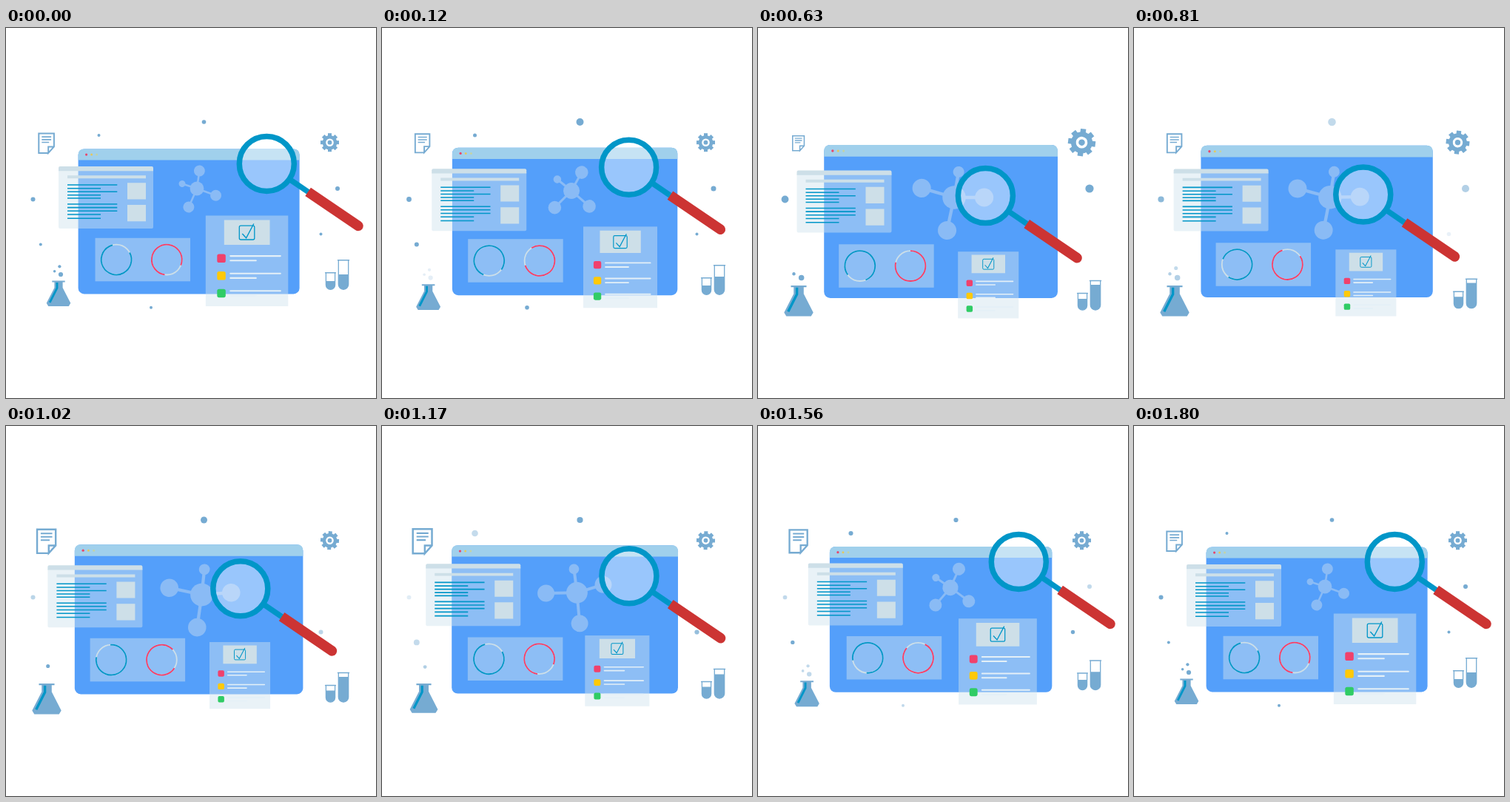
These frames come from a looping animation (500 px wide and 500 px high, 1830 ms). An HTML page:

```html
<!DOCTYPE html>
<html lang="en">
<head>
<meta charset="utf-8">
<title>Research dashboard</title>
<style>
  html, body { margin: 0; width: 100%; height: 100%; overflow: hidden; background: #fff; }
  svg { display: block; width: 100vw; height: 100vh; }
  .soft { fill: #76abd2; }
  .softLine { fill: none; stroke: #76abd2; }
  .glass { fill: #cfe3ed; fill-opacity: .46; }
  .pale { fill: #cddfe8; }
  .teal { fill: none; stroke: #0096c8; }
</style>
</head>
<body>
<svg viewBox="0 0 500 500">
  <g id="dots" class="soft"></g>

  <g id="page">
    <path class="softLine" stroke-width="2" d="M2.6 13.2H-10.3V-13.2H10.3V4.6L2.6 13.2V4.6H10.3"/>
    <path class="softLine" stroke-width="1.7" d="M-6.3-8.7H6.5M-6.3-5H6.5M-6.3-1.3H3.6"/>
  </g>

  <g id="gear"></g>

  <g id="tubes"></g>

  <g id="flask">
    <path class="soft" d="M-8.7-34.4H8.7V-32.4H5.6V-25L16.3-4.2L13.8 0H-13.8L-16.3-4.2L-5.6-25V-32.4H-8.7Z"/>
    <path class="teal" stroke-width="2.8" d="M-2-32V-24.5L-11.8-5.2"/>
    <g id="bubbles" class="soft"></g>
  </g>

  <g id="window">
    <rect x="-149.5" y="-98" width="299" height="196" rx="8" fill="#549ffa"/>
    <path fill="#a0d0ec" d="M-149.5-83V-90Q-149.5-98-141.5-98H141.5Q149.5-98 149.5-90V-83Z"/>
    <circle cx="-138.5" cy="-90.3" r="1.6" fill="#e8476c"/>
    <circle cx="-131.5" cy="-90.3" r="1.5" fill="#e3c860"/>
    <circle cx="-124.5" cy="-90.3" r="1.5" fill="#c3d3a5"/>
  </g>

  <g id="molecule" fill="#8abbf5" stroke="#8abbf5"></g>

  <g id="article">
    <rect class="glass" y="3" width="128" height="81" rx="2"/>
    <path class="pale" d="M0 6.2V2Q0 0 2 0H126Q128 0 128 2V6.2Z"/>
    <path class="pale" d="M12 12.3H118V16.2H12ZM93 22.3H118V44.4H93ZM93 52H118V74.2H93Z"/>
    <path id="text" class="teal" stroke-width="1.6"/>
  </g>

  <g id="charts">
    <rect class="glass" width="128.5" height="58.5"/>
  </g>

  <g id="card">
    <rect class="glass" width="111.5" height="122.5"/>
    <path class="pale" d="M25 6H86.7V39.6H25Z"/>
    <rect class="teal" x="45.5" y="13.7" width="20.5" height="18.8" rx="2" stroke-width="1.3"/>
    <path class="teal" stroke-width="1.4" d="M49.5 24.5L54.8 30.3L65 11"/>
  </g>

  <g id="lens">
    <circle r="37" fill="#fff" fill-opacity=".4"/>
    <g transform="rotate(34.2)">
      <path stroke="#0096c8" stroke-width="7.5" d="M39 0H70"/>
      <path fill="#cc3433" d="M67.5-6.8H149.5A6.8 6.8 0 0 1 149.5 6.8H67.5Z"/>
    </g>
    <circle class="teal" r="37" stroke-width="7.5"/>
  </g>
</svg>
<script>
const LOOP = 1830, STEP = 30;
const TIMES = [0, 120, 390, 630, 1020, 1350, 1800];
const COUNT = TIMES.length - 1;

const $ = id => document.getElementById(id);

function add(parent, tag, attrs) {
  const node = document.createElementNS('http://www.w3.org/2000/svg', tag);
  for (const key in attrs) node.setAttribute(key, attrs[key]);
  return parent.appendChild(node);
}

// Smooth periodic curve through one value per entry of TIMES, without overshoot;
// `gain` is what the value gains over a whole loop.
function curve(values, gain = 0) {
  const points = [...values, values[0] + gain];
  const span = i => TIMES[i + 1] - TIMES[i];
  const slope = i => (points[i + 1] - points[i]) / span(i);
  const tangents = points.map((_, i) => {
    const before = (i + COUNT - 1) % COUNT, after = i % COUNT;
    const a = slope(before), b = slope(after);
    if (a * b <= 0) return 0;
    const u = span(before), v = span(after);
    return 3 * (u + v) / ((2 * v + u) / a + (v + 2 * u) / b);
  });
  return t => {
    let i = 0;
    while (i < COUNT - 1 && t >= TIMES[i + 1]) i++;
    const h = span(i), x = Math.min(1, (t - TIMES[i]) / h), y = 1 - x;
    return points[i] * (1 + 2 * x) * y * y + points[i + 1] * (3 - 2 * x) * x * x
      + h * x * y * (tangents[i] * y - tangents[i + 1] * x);
  };
}

const steady = value => () => value;

function mover(id, x, y, scale = steady(1), turn = steady(0)) {
  const node = $(id);
  return t => node.setAttribute('transform',
    `translate(${x(t)} ${y(t)}) scale(${scale(t)}) rotate(${turn(t)})`);
}

// Floating dots: centre, radii, opacities
const dots = [
  [125.5, 145, [2, 2.5, 3.6, 4.2, 4.4, 4.1], [1, 1, 1, 0, 0, 1]],
  [267.5, 127, [2.8, 5, 6, 5.8, 4.5, 3.6], [1, 1, 0, 0, 1, 1]],
  [36.5, 231.5, [3, 3.4, 4.2, 4.9, 3, 2.8], [1, 1, 1, 1, .5, 0]],
  [46.8, 292.4, [2, 3, 4, 4.4, 4.2, 3.5], [1, 1, 0, 0, 0, 1]],
  [196, 377.7, [2, 2.8, 4.1, 4.6, 3, 2], [1, 1, 1, 0, 0, 0]],
  [448, 217, [3, 3.5, 4.7, 5.6, 4, 3], [1, 1, 1, 1, 0, 0]],
  [425.5, 278.5, [2, 2, 2, 2.5, 3, 3.2], [1, 1, 0, 0, .5, 1]]
].map(([cx, cy, radii, alphas]) => {
  const node = add($('dots'), 'circle', { cx, cy });
  const radius = curve(radii), alpha = curve(alphas);
  return t => {
    node.setAttribute('r', radius(t));
    node.setAttribute('opacity', alpha(t));
  };
});

const bubbles = [
  [3, -43, 3.1, [1, .2, 1, 1, 0, 0]],
  [1.4, -53.7, 2.1, [1, .2, 0, 0, 1, 0]],
  [-5.4, -47.3, 1.8, [1, .2, 0, 1, 0, 0]]
].map(([cx, cy, r, alphas]) => {
  const node = add($('bubbles'), 'circle', { cx, cy, r });
  const alpha = curve(alphas);
  return t => node.setAttribute('opacity', alpha(t));
});

// Gear
for (let a = 0; a < 360; a += 45) {
  add($('gear'), 'rect', { class: 'soft', x: -2.5, y: -12.5, width: 5, height: 6, transform: `rotate(${a})` });
}
for (const [r, fill] of [[9.8, '#76abd2'], [5.3, '#fff'], [2.9, '#76abd2']]) {
  add($('gear'), 'circle', { r, fill });
}

// Test tubes: outline plus a liquid whose surface moves
const tubes = [
  [438.5, 6.1, 17, 23.3, [12, 11, 10, 8.2, 7.7, 7.7]],
  [456, 6.7, 0, 40.3, [20, 16, 9.7, 6.2, 6.2, 11]]
].map(([x, half, top, height, levels]) => {
  const group = add($('tubes'), 'g', { transform: `translate(${x} ${top})` });
  const cup = from => `M${-half} ${from}V${height - half}A${half} ${half} 0 0 0 ${half} ${height - half}V${from}`;
  const liquid = add(group, 'path', { class: 'soft' });
  add(group, 'path', { class: 'softLine', 'stroke-width': 1.3, d: cup(1) });
  add(group, 'path', { class: 'softLine', 'stroke-width': 1.5, 'stroke-linecap': 'round',
    d: `M${-half - .8} .8H${half + .8}` });
  const level = curve(levels);
  return t => liquid.setAttribute('d', cup(level(t)) + 'Z');
});

// Molecule: angle, distance, radius
for (const [angle, distance, r] of [[-82, 24.3, 7.5], [20, 27.2, 7.5], [114, 27.3, 7.5], [198, 21, 4.5]]) {
  const arm = add($('molecule'), 'g', { transform: `rotate(${angle})` });
  add(arm, 'path', { d: `M0 0H${distance}`, 'stroke-width': 2.6 });
  add(arm, 'circle', { cx: distance, r, stroke: 'none' });
}
add($('molecule'), 'circle', { r: 9.4, stroke: 'none' });

// Article lines
const longLines = [25, 34.3, 51, 55.6, 60.3], shortLines = [29.8, 38.8, 43, 65, 70.3];
$('text').setAttribute('d',
  longLines.map(y => `M12 ${y}H79.3`).join('') + shortLines.map(y => `M12 ${y}H57`).join(''));

// Ring charts
const spin = curve([0, 140, 430, 532, 655, 810], 1080);
const rings = [[28.6, -28, '#0096c8'], [96.8, 98, '#f53d68']].map(([x, start, stroke]) => {
  const group = add($('charts'), 'g', { transform: `translate(${x} 29.3)`, fill: 'none', 'stroke-width': 1.8 });
  add(group, 'circle', { r: 20.4, stroke: '#cddfe8' });
  const arc = add(group, 'circle', { r: 20.4, stroke, pathLength: 360, 'stroke-dasharray': '284 76' });
  return t => arc.setAttribute('transform', `rotate(${start + spin(t)})`);
});

// Checklist rows
['#f0416c', '#ffc908', '#30cc65'].forEach((fill, i) => {
  const row = add($('card'), 'g', { transform: `translate(0 ${52 + i * 23.6})` });
  add(row, 'rect', { x: 15.5, width: 11.5, height: 11.5, rx: 2.6, fill });
  add(row, 'path', { d: 'M33.5 2.6H101M33.5 8.8H68', stroke: '#e4f0f7', 'stroke-width': 2.1, 'stroke-linecap': 'round' });
});

const turn = curve([0, 21, 68, 82, 78, 41]);

const parts = [
  ...dots, ...bubbles, ...tubes, ...rings,
  mover('page', steady(54.6), steady(155.8), curve([1, .95, .81, .76, 1.22, 1.27])),
  mover('gear', steady(437.5), steady(154.7), curve([1, 1, 1.4, 1.48, 1, 1]), curve([0, 0, 5, 7, 4, 0])),
  mover('tubes', steady(0), curve([313, 320, 335, 340.8, 332.8, 321.7])),
  mover('flask', curve([71, 62.6, 55, 55, 55, 60.1]), curve([376, 381, 389.5, 389.5, 389.5, 384]),
    curve([1, 1.01, 1.21, 1.21, 1.21, 1.07])),
  mover('window', steady(247.1), steady(261.4), curve([1, 1.018, 1.056, 1.056, 1.032, 1.013])),
  mover('molecule', curve([258, 256, 262, 265, 264.5, 261.5]), curve([217, 220, 227, 229, 228, 221]),
    t => 1 + turn(t) / 122, turn),
  mover('article', curve([71, 67.2, 57.4, 52.5, 56.4, 63.2]), curve([187, 190.2, 196.2, 192.5, 188.2, 185])),
  mover('charts', curve([120.5, 116.2, 109.2, 109.2, 113.6, 118.2]), curve([283.8, 285.2, 292, 292.3, 286.8, 284.5])),
  mover('card', curve([269.8, 272, 272.4, 270.2, 275, 272.8]), curve([253.5, 268.4, 298, 302.2, 292, 271]),
    curve([1, .897, .736, .736, .736, .87])),
  mover('lens', curve([352.3, 333.6, 309.4, 307.4, 316.8, 352.3]), curve([183.4, 188.2, 217.5, 226.6, 219.8, 183.4]))
];

function draw(t) {
  for (const update of parts) update(t);
}

function tick() {
  draw(Math.floor(performance.now() % LOOP / STEP) * STEP);
  requestAnimationFrame(tick);
}
tick();
</script>
</body>
</html>
```
